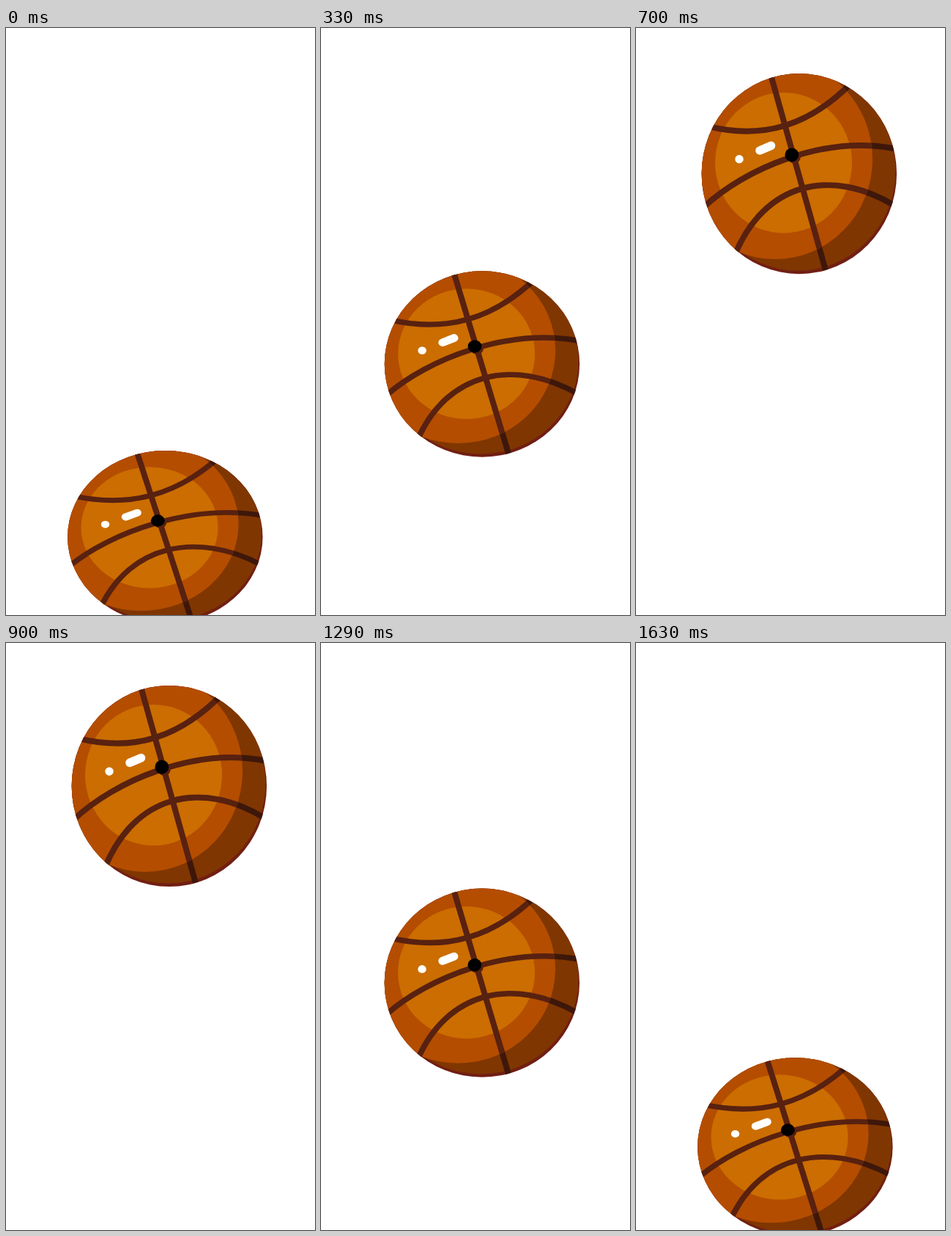
Animation, 422 px wide and 800 px high, one loop 1670 ms. Source, as an HTML page:

```html
<!DOCTYPE html>
<html lang="en">
<head>
<meta charset="utf-8">
<title>Bouncing ball</title>
<style>
  html, body { margin: 0; width: 100%; height: 100%; overflow: hidden; background: #fff; }
  svg { display: block; width: 100%; height: 100%; }
</style>
</head>
<body>
<svg viewBox="0 0 422 800">
  <defs>
    <clipPath id="round"><ellipse cx="222.8" cy="195" rx="133.2" ry="137"/></clipPath>
    <clipPath id="lit"><ellipse cx="190" cy="174.8" rx="133" ry="137"/></clipPath>
    <g id="seams" fill="none" stroke-width="8">
      <path d="M183 56L262 338"/>
      <path d="M98 130C175 149 237 128 293 72"/>
      <path d="M92 241C148 188 258 141 356 161"/>
      <path d="M135 306C175 208 265 185 354 239"/>
    </g>
  </defs>
  <g id="ball">
    <g clip-path="url(#round)">
      <rect x="85" y="50" width="280" height="290" fill="#711f13"/>
      <ellipse cx="221.3" cy="190.5" rx="133.2" ry="137" fill="#803600"/>
      <use href="#seams" stroke="#3e170b"/>
      <g clip-path="url(#lit)">
        <rect x="85" y="50" width="280" height="290" fill="#b44d00"/>
        <ellipse cx="201.5" cy="180" rx="93.5" ry="96" fill="#cb6d00"/>
        <use href="#seams" stroke="#582110"/>
      </g>
      <circle cx="216" cy="172" r="8.8" fill="#582110"/>
      <circle cx="212.8" cy="169" r="9.4"/>
      <circle cx="141" cy="175" r="5.7" fill="#fff"/>
      <path d="M169 163.2L184.5 156.6" stroke="#fff" stroke-width="11.6" stroke-linecap="round"/>
    </g>
  </g>
</svg>
<script>
  const LOOP = 1670, STEP = 33.2, LAST = 49, PEAK = 24;
  const ball = document.getElementById('ball');

  // The ball rises and falls at constant speed, stretching with height.
  function draw(ms) {
    const step = Math.min(LAST, Math.floor((ms % LOOP + 5) / STEP));
    const d = step - PEAK, rising = d < 0;
    const x = 90.4 - Math.abs(d) * (rising ? 0.26 : 0.25);
    const top = -11.3 + Math.abs(d) * (rising ? 24.47 : 23.06);
    const height = 278.5 - Math.abs(d) * (rising ? 1.79 : 1.42);
    ball.setAttribute('transform',
      `translate(${x} ${top}) scale(1 ${height / 274}) translate(-89.6 -58)`);
  }

  const start = performance.now();
  function tick() {
    draw(performance.now() - start);
    requestAnimationFrame(tick);
  }
  tick();
</script>
</body>
</html>
```
